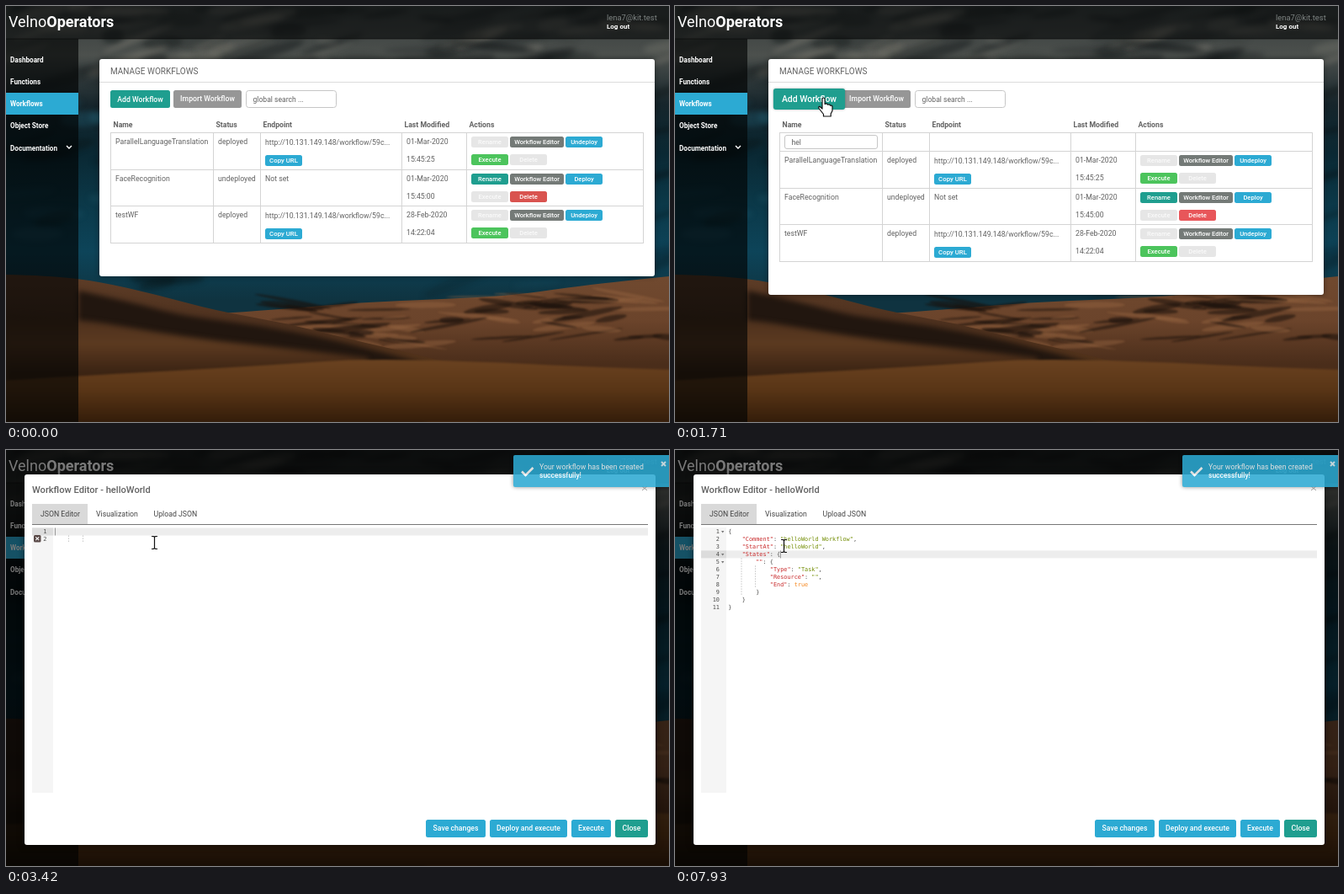
An HTML page with a canvas for the animation above (8 s loop, 788x494 px).

```html
<!DOCTYPE html>
<html lang="en">
<head>
<meta charset="utf-8">
<title>Workflow manager</title>
<style>
  html, body { margin: 0; width: 100%; height: 100%; overflow: hidden; background: #000; }
  canvas { display: block; width: 788px; height: 494px; }
</style>
</head>
<body>
<canvas id="stage"></canvas>
<script>
const W = 788, H = 494, LOOP = 8000;
const SCALE = window.devicePixelRatio || 1;
const TEAL = '#1f9e8f', BLUE = '#2caad3', GRAY = '#969696', DARK = '#747a77',
      RED = '#e8565a', GREEN = '#4cc45c', OFF = '#e6e6e6', INK = '#626262';
const SANS = 'Roboto, sans-serif', MONO = '"DejaVu Sans Mono", monospace';

function makeCanvas(el = document.createElement('canvas')) {
  el.width = W * SCALE;
  el.height = H * SCALE;
  const c = el.getContext('2d');
  c.scale(SCALE, SCALE);
  return c;
}
const main = makeCanvas(document.getElementById('stage'));
const layer = makeCanvas();
const back = makeCanvas();
let g = main;

// ---------- helpers ----------
const clamp = v => Math.max(0, Math.min(1, v));
const span = (t, a, b) => clamp((t - a) / (b - a));
const smooth = v => v * v * (3 - 2 * v);
const count = (times, t) => times.filter(v => t >= v).length;

// Text centred on y, with its baseline on a whole pixel.
function text(s, x, y, { size = 8.73, weight = 400, color = INK, align = 'left', font = SANS } = {}) {
  g.font = `${weight} ${size}px ${font}`;
  g.fillStyle = color;
  g.textAlign = align;
  g.fillText(s, x, Math.round(y + size * 0.34));
}
function rect(x, y, w, h, color) {
  g.fillStyle = color;
  g.fillRect(x, y, w, h);
}
function round(x, y, w, h, r, fill, stroke) {
  g.beginPath();
  g.roundRect(x, y, w, h, r);
  if (fill) { g.fillStyle = fill; g.fill(); }
  if (stroke) { g.strokeStyle = stroke; g.lineWidth = 1; g.stroke(); }
}
function line(points, color, width = 1) {
  g.beginPath();
  points.forEach(([x, y]) => g.lineTo(x, y));
  g.strokeStyle = color;
  g.lineWidth = width;
  g.stroke();
}
function shadowed(blur, color, draw) {
  g.save();
  g.shadowBlur = blur * SCALE;
  g.shadowColor = color;
  draw();
  g.restore();
}
function button(label, x, y, w, h, fill, size = 8.7, color = '#fff') {
  round(x, y, w, h, 2.5, fill);
  text(label, x + w / 2, y + h / 2, { size, weight: 500, color, align: 'center' });
}
// Draws a whole group with one opacity.
function group(alpha, draw) {
  if (alpha <= 0) return;
  layer.clearRect(0, 0, W, H);
  g = layer;
  draw();
  g = main;
  g.globalAlpha = alpha;
  g.drawImage(layer.canvas, 0, 0, W, H);
  g.globalAlpha = 1;
}

// ---------- backdrop scenery ----------
function gradient(y0, y1, ...colors) {
  const gr = g.createLinearGradient(0, y0, 0, y1);
  colors.forEach((c, i) => gr.addColorStop(i / (colors.length - 1), c));
  return gr;
}
function dune(points, fill) {
  g.beginPath();
  g.moveTo(points[0][0], H);
  g.lineTo(...points[0]);
  for (let i = 1; i < points.length - 1; i++) {
    const [x, y] = points[i], [nx, ny] = points[i + 1];
    g.quadraticCurveTo(x, y, (x + nx) / 2, (y + ny) / 2);
  }
  g.lineTo(...points[points.length - 1]);
  g.lineTo(points[points.length - 1][0], H);
  g.fillStyle = fill;
  g.fill();
}
function paintScenery() {
  g = back;
  let seed = 11;
  const rnd = (a, b) => {
    seed = (seed * 16807) % 2147483647;
    return a + (b - a) * seed / 2147483647;
  };
  const blob = (x, y, rx, ry, tilt, color) => {
    g.beginPath();
    g.ellipse(x, y, rx, ry, tilt, 0, Math.PI * 2);
    g.fillStyle = color;
    g.fill();
  };
  rect(0, 0, W, H, gradient(0, 350, '#353b3b', '#4c504d', '#16252b', '#0a2833', '#0b3848', '#0d4459', '#0f3340'));
  g.filter = 'blur(3px)';
  for (let i = 0; i < 190; i++) {
    const y = rnd(0, 1) ** 1.6 * 330;
    const tone = i % 5 < 3 ? '8,13,15' : y < 110 ? '150,146,134' : '34,92,112';
    blob(rnd(0, W), y, rnd(10, 55), rnd(2, 9), rnd(-0.4, 0.1), `rgba(${tone},${rnd(0.15, 0.45)})`);
  }
  g.filter = 'none';
  dune([[240, 366], [330, 360], [420, 352], [520, 348], [600, 344], [670, 334], [720, 328], [788, 321]],
    gradient(322, 425, '#70492f', '#6b442b', '#4a2d1a'));
  g.filter = 'blur(.8px)';
  for (let i = 0; i < 70; i++) {
    const x = rnd(320, W), y = 350 - (x - 320) * 0.03 + rnd(0, 58);
    blob(x, y, rnd(14, 50), rnd(1, 4), rnd(-0.2, 0.2), i % 3 ? 'rgba(26,17,12,.55)' : 'rgba(150,100,64,.45)');
  }
  g.filter = 'none';
  dune([[0, 319], [50, 320], [110, 327], [180, 343], [250, 362], [330, 376], [410, 396], [480, 412], [560, 432]],
    gradient(319, 440, '#5e3d27', '#4c301e', '#553419'));
  g.filter = 'blur(3px)';
  dune([[86, 338], [150, 352], [210, 368], [300, 379], [390, 396], [500, 425]], '#21160f');
  dune([[0, 366], [90, 372], [170, 386], [250, 398], [330, 406], [430, 418]],
    gradient(366, 436, '#4a2f1d', '#5c3a20', '#3a2313'));
  g.filter = 'blur(1px)';
  dune([[-5, 445], [90, 439], [200, 433], [320, 426], [420, 419], [560, 422], [680, 428], [793, 432]],
    gradient(418, 494, '#6b4321', '#593516', '#341d0a'));
  g.filter = 'none';
  g = main;
}

// ---------- page ----------
const FLOWS = [
  { name: 'helloWorld' },
  { name: 'ParallelLanguageTranslation', live: true, day: '01-Mar-2020', hour: '15:45:25' },
  { name: 'FaceRecognition', day: '01-Mar-2020', hour: '15:45:00' },
  { name: 'testWF', live: true, day: '28-Feb-2020', hour: '14:22:04' }
];
const COLS = [124.5, 246.5, 302.5, 470.5, 547.5, 757.5];
const TOP = 150.5, EDIT_ROW = 22;
const rowHeight = f => f.live ? 44 : 43;
const ADDED = 920, SAVED = 2650, OPEN = 3095, LOADED = 3650;
const NAME_KEYS = [1450, 1600, 1710, 1850, 2000, 2170, 2250, 2330, 2500, 2580];
const CODE_KEYS = [5320, 5540, 5620, 6350, 6520, 6670, 6820, 6990, 7060, 7130];

function grid(y, h) {
  g.strokeStyle = '#d4d4d4';
  g.lineWidth = 1;
  for (let i = 0; i < 5; i++) g.strokeRect(COLS[i], y, COLS[i + 1] - COLS[i], h);
}
function flowRow(f, y, hot) {
  grid(y, rowHeight(f));
  const a = y + 10.6, b = y + 32;
  text(f.name, 130, a);
  text(f.live ? 'deployed' : 'undeployed', 252, a);
  if (f.live) {
    text('http://10.131.149.148/workflow/59c...', 308, a + 1);
    button('Copy URL', 308, y + 26.5, 44, 13, BLUE, 7.8);
  } else {
    text('Not set', 308, a);
  }
  text(f.day || 'Not set', 476, a);
  if (f.hour) text(f.hour, 476, b);
  const act = (label, x, dy, w, on, fill) =>
    button(label, x, y + dy, w, 13, on ? fill : OFF, 7.6, on ? '#fff' : '#fafafa');
  act('Rename', 553, 4.5, 44, !f.live, TEAL);
  act('Workflow Editor', 599, 4.5, 64, true, DARK);
  act(f.live ? 'Undeploy' : 'Deploy', 665, 4.5, 44, true, BLUE);
  act('Execute', 553, 25.5, 44, f.live, GREEN);
  act('Delete', 599, 25.5, 44, !f.live, hot ? '#d9534f' : RED);
}
function page(t) {
  g.drawImage(back.canvas, 0, 0, W, H);
  rect(0, 0, W, 39, 'rgba(10,11,11,.64)');
  rect(0, 39, 86, H - 39, 'rgba(3,4,4,.66)');
  rect(0, 38.5, W, 1, 'rgba(0,0,0,.5)');
  text('Velno', 3, 18.5, { size: 18, color: '#fff' });
  const w = g.measureText('Velno').width;
  text('Operators', 3 + w, 18.5, { size: 18, weight: 700, color: '#fff' });
  text('lena7@kit.test', 714, 14, { size: 9.4, color: '#7f8584' });
  text('Log out', 714, 24, { size: 8, weight: 700, color: '#fff' });
  rect(0, 103, 86, 26, BLUE);
  ['Dashboard', 'Functions', 'Workflows', 'Object Store', 'Documentation'].forEach((s, i) =>
    text(s, 5, 64 + 26.2 * i, { size: 8.17, weight: 700, color: '#fff' }));
  line([[72, 166], [75, 169], [78, 166]], '#fff', 1.4);

  const extra = t < ADDED ? 0 : t < SAVED ? EDIT_ROW : rowHeight(FLOWS[0]);
  shadowed(6, 'rgba(0,0,0,.45)', () => round(111, 63, 660, 258 + extra, 3, '#fff'));
  text('MANAGE WORKFLOWS', 124, 77.5, { size: 10 });
  rect(111, 90, 660, 1, '#dcdcdc');
  button('Import Workflow', 199, 100, 81, 21, GRAY);
  round(285.5, 100.5, 107, 20, 3, '#fff', '#c6c6c6');
  text('global search ...', 293.5, 111, { size: 8.6 });

  const zoom = 1 + 0.2 * smooth(span(t, 590, 740)) * (t < OPEN);
  g.save();
  g.translate(159.5, 110.5);
  g.scale(zoom, zoom);
  if (zoom > 1) { g.shadowBlur = 3 * SCALE; g.shadowColor = 'rgba(0,0,0,.3)'; }
  round(-35.5, -10.5, 71, 21, 2.5, TEAL);
  g.shadowColor = 'transparent';
  text('Add Workflow', 0, 0, { size: 8.7, weight: 500, color: '#fff', align: 'center' });
  g.restore();

  [['Name', 127.5], ['Status', 249.5], ['Endpoint', 305.5], ['Last Modified', 473.5], ['Actions', 550.5]]
    .forEach(([s, x]) => text(s, x, 141, { size: 8.7, weight: 700 }));
  let y = TOP;
  if (t >= ADDED && t < SAVED) {
    grid(y, EDIT_ROW);
    round(130.5, 153.5, 110, 16, 2.5, '#fff', '#c6c6c6');
    text('helloWorld'.slice(0, count(NAME_KEYS, t)), 138.4, 162);
    y += EDIT_ROW;
  }
  FLOWS.slice(t < SAVED ? 1 : 0).forEach(f => {
    flowRow(f, y, t < 250);
    y += rowHeight(f);
  });
}

// ---------- editor dialog ----------
const CHAR = 4.13, LINE = 8.97;
const lineY = i => 97 + LINE * i;
const mono = (s, x, y, color, weight = 400) => text(s, x, y, { size: 6.86, font: MONO, color, weight });

function codeLines(t) {
  return [
    '{',
    '    "Comment": "helloWorld Workflow",',
    `    "StartAt": "${'helloWorld'.slice(0, count(CODE_KEYS, t))}",`,
    '    "States": {',
    '        "": {',
    '            "Type": "Task",',
    '            "Resource": "",',
    '            "End": true',
    '        }',
    '    }',
    '}'
  ];
}
function codeLine(s, x, y) {
  for (const m of s.matchAll(/"[^"]*"(?=:)|"[^"]*"|true|[{}:,]/g)) {
    const key = s[m.index + m[0].length] === ':';
    const color = m[0] === 'true' ? '#f5871f' : m[0][0] !== '"' ? '#4d4d4c' : key ? '#c82829' : '#718c00';
    mono(m[0], x + m.index * CHAR, y, color);
  }
}
function guide(x, from, to) {
  g.setLineDash([1.5, 1.5]);
  line([[x, lineY(from) - 4.5], [x, lineY(to) + 4.5]], '#b8b8b8', 0.8);
  g.setLineDash([]);
}
function editor(t) {
  const loaded = t >= LOADED;
  const edge = loaded ? 61 : 56, x0 = edge + 2.2;
  const active = t < 4690 ? 0 : t < 7930 ? 2 : 3;
  const typed = count(CODE_KEYS, t);
  rect(31, 92, edge - 31, 315, '#f5f5f5');
  rect(31, lineY(active) - 4.5, edge - 31, 9, '#dcdcdc');
  rect(edge, lineY(active) - 4.5, 763 - edge, 9, '#ededed');
  const lines = loaded ? codeLines(t) : ['', ''];
  lines.forEach((s, i) => {
    text(String(i + 1), loaded ? 53 : 48.5, lineY(i), { size: 6.86, font: MONO, color: '#4d4d4c', align: 'right' });
    codeLine(s, x0, lineY(i));
  });
  if (loaded) {
    [0, 3, 4].forEach(i => {
      const y = lineY(i);
      g.beginPath();
      g.moveTo(55, y - 1); g.lineTo(58.4, y - 1); g.lineTo(56.7, y + 1.5);
      g.fillStyle = '#777';
      g.fill();
    });
    guide(79, 4, 8);
    guide(95.5, 5, 7);
  } else {
    guide(74.5, 1, 1);
    guide(91.5, 1, 1);
    round(33, 101, 8.5, 8.5, 1.5, '#5a4a48');
    line([[35.3, 103.3], [39.2, 107.2]], '#fff', 1.1);
    line([[39.2, 103.3], [35.3, 107.2]], '#fff', 1.1);
  }
  const col = active === 0 ? 0 : active === 2 ? 16 + typed : 15;
  const hidden = (t >= 4280 && t < 4690) || (t >= 7760 && t < 7930);
  if (!hidden) rect(Math.round(x0 + col * CHAR), lineY(active) - 4.5, 1, 9, '#9a9a9a');

  if (t >= 5390 && t < 7130) {
    shadowed(3, 'rgba(0,0,0,.35)', () => rect(126, 119.5, 175.5, 11, '#cad6fa'));
    mono('helloWorld'.slice(0, typed), 128.8, 125, '#000', 700);
    mono('helloWorld'.slice(typed), 128.8 + typed * CHAR, 125, '#444');
    mono('local', 277, 125, '#777');
  }
}
function dialog(t) {
  shadowed(8, 'rgba(0,0,0,.5)', () => round(22, 29, 750, 440, 3, '#fff'));
  text('Workflow Editor - helloWorld', 31, 47, { size: 11.1, weight: 500 });
  line([[756, 43], [762, 48]], '#aaa', 1);
  line([[762, 43], [756, 48]], '#aaa', 1);
  rect(31, 64, 66, 24, '#d9d9d9');
  [['JSON Editor', 41], ['Visualization', 107], ['Upload JSON', 175.5]].forEach(([s, x]) =>
    text(s, x, 76, { color: '#444' }));
  rect(31, 88, 732, 1, '#777');
  editor(t);
  button('Save changes', 499, 439, 71, 21, BLUE);
  button('Deploy and execute', 575, 439, 92, 21, BLUE);
  button('Execute', 672, 439, 47, 21, BLUE);
  button('Close', 724, 439, 39, 21, TEAL);
}
function toast() {
  shadowed(5, 'rgba(0,0,0,.5)', () => round(603, 6, 190, 38, 2, '#2caad3'));
  line([[613, 25.5], [617.5, 30], [626.5, 21]], '#fff', 2.6);
  text('Your workflow has been created', 634, 20, { color: '#fff' });
  text('successfully!', 634, 30, { size: 8.5, weight: 500, color: '#fff' });
  line([[779, 14], [784, 19]], '#dff2f8', 2);
  line([[784, 14], [779, 19]], '#dff2f8', 2);
}

// ---------- pointer ----------
const PATH = [[70, 560, 440], [640, 195, 134], [800, 173.5, 116], [920, 173.5, 116], [1130, 176.5, 109],
  [3080, 176.5, 109], [3110, 176.5, 110], [3650, 176.5, 110], [3880, 137, 110], [4050, 136, 110],
  [4430, 136, 110], [4500, 129.5, 114]];

function pointer(t) {
  let i = PATH.findIndex(p => p[0] > t);
  if (i < 0) return PATH[PATH.length - 1].slice(1);
  if (i === 0) i = 1;
  const [ta, xa, ya] = PATH[i - 1], [tb, xb, yb] = PATH[i];
  const k = smooth(span(t, ta, tb));
  return [xa + (xb - xa) * k, ya + (yb - ya) * k];
}
function icon(x, y, d) {
  g.save();
  g.translate(x, y);
  const p = new Path2D(d);
  g.fillStyle = '#fff';
  g.fill(p);
  g.strokeStyle = '#111';
  g.lineWidth = 1.2;
  g.lineJoin = 'round';
  g.stroke(p);
  g.restore();
}
const ARROW = 'M0 0V16L3.8 12.5 6.3 18 8.8 17 6.4 11.6H11.5Z';
const HAND = 'M-1.5 1.5Q-1.5 0 0 0T1.6 1.5V7.5Q4 6 5 8.2 7.2 7 8 9.2 10.5 8.5 10.5 11V15.5L8.7 19V22H0V19.5L-5.5 12.5Q-6.5 10.5-4.5 10.3L-1.5 13Z';

function ibeam(x, y) {
  const draw = (color, w) => {
    line([[x, y - 7], [x, y + 7]], color, w);
    [-1, 1].forEach(s => line([[x - 3.5, y + 7.5 * s], [x - 1, y + 7.5 * s], [x, y + 6.5 * s],
      [x + 1, y + 7.5 * s], [x + 3.5, y + 7.5 * s]], color, w));
  };
  draw('rgba(255,255,255,.5)', 2.2);
  draw('#111', 1.2);
}
function ring(x, y, r, alpha) {
  if (alpha <= 0) return;
  g.beginPath();
  g.arc(x, y, r, 0, Math.PI * 2);
  g.fillStyle = `rgba(222,224,30,${alpha})`;
  g.fill();
}
function drawPointer(t) {
  if (t < 70) return;
  const [x, y] = pointer(t);
  if (t >= 770 && t < 1060) ring(x - 1.5, y - 2, 15, 0.75 * (1 - span(t, 920, 1060)));
  if (t >= 4690 && t < 4750) ring(x, y, 13, 0.7);
  if (t >= OPEN) ibeam(x, y);
  else icon(x, y, t < 620 ? ARROW : HAND);
}

// ---------- loop ----------
function draw(t) {
  g.clearRect(0, 0, W, H);
  page(t);
  if (t >= OPEN) {
    const fade = span(t, OPEN, OPEN + 150);
    const slide = -110 * Math.pow(1 - span(t, OPEN, OPEN + 300), 1.7);
    rect(0, 0, W, H, `rgba(0,0,0,${0.52 * fade})`);
    group(fade, () => {
      g.save();
      g.translate(0, slide);
      dialog(t);
      g.restore();
    });
    group(0.87 * span(t, OPEN, OPEN + 250), toast);
  }
  drawPointer(t);
}
function frame() {
  draw(performance.now() % LOOP);
  requestAnimationFrame(frame);
}
paintScenery();
frame();
</script>
</body>
</html>
```
